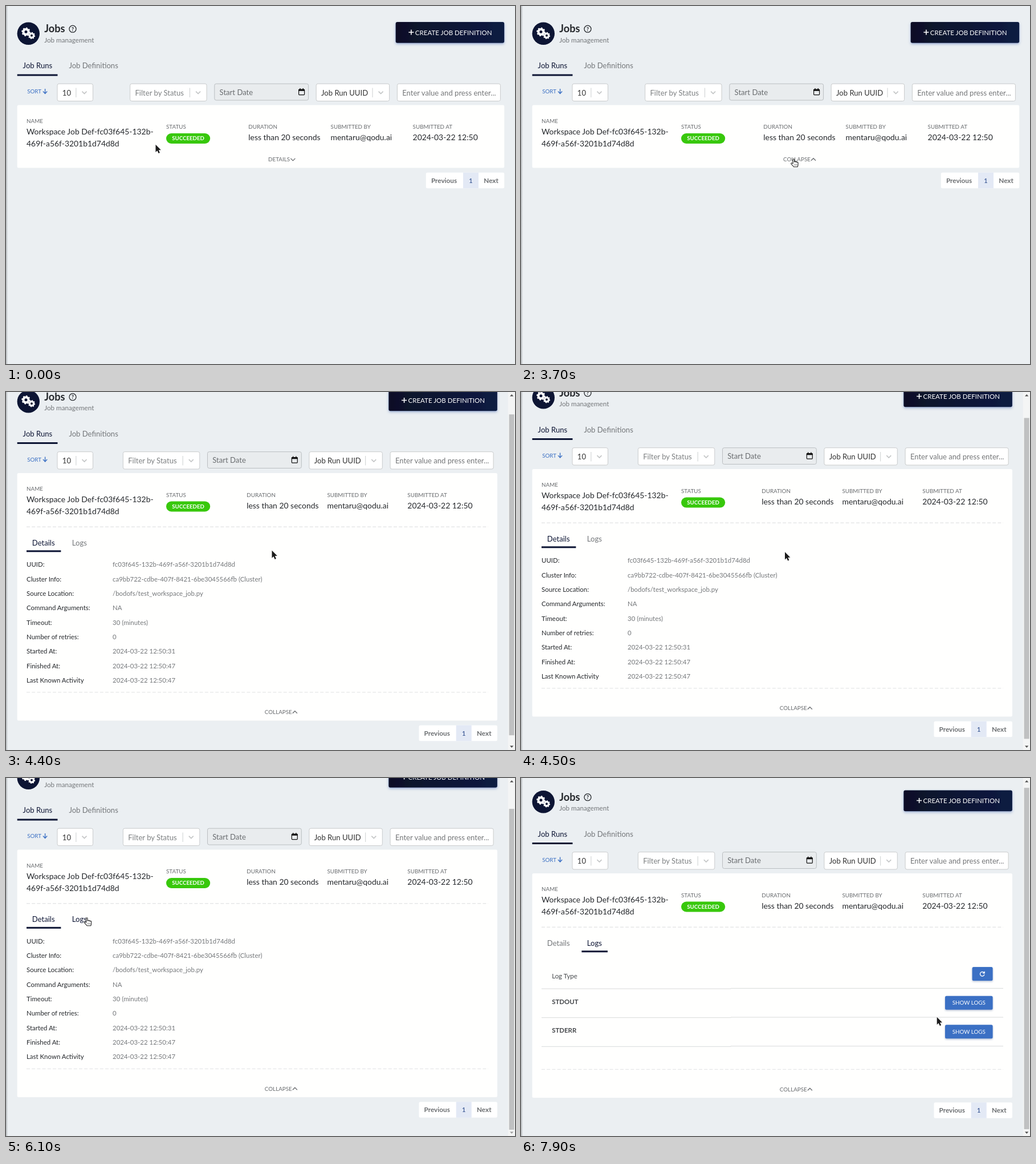
Write an HTML page that moves like this. It is 893 px wide and 627 px high and loops after 8 s.

```html
<!DOCTYPE html>
<html lang="en">
<head>
<meta charset="utf-8">
<title>Jobs</title>
<style>
  html, body { margin: 0; width: 100%; height: 100%; overflow: hidden; background: #ebeff2; }
  svg { display: block; width: 893px; height: 627px; font-family: Lato, sans-serif; }
  text { white-space: pre; }
</style>
</head>
<body>
<svg id="stage" viewBox="0 0 893 627" xmlns="http://www.w3.org/2000/svg"></svg>
<script>
const LOOP = 8000, STEP = 100;
const NAVY = '#0d1534', INK = '#24272b', GREY = '#74777a', BLUE = '#3b70c4';
const SIZE = { xs: 9.82, s: 11.45, m: 13.09, l: 13.91 };

// Markup helpers
const text = (x, y, str, size, fill = INK, more = '') =>
  `<text x="${x}" y="${y}" font-size="${size}" fill="${fill}" ${more}>${str}</text>`;
const rect = (x, y, w, h, fill, more = '') =>
  `<rect x="${x}" y="${y}" width="${w}" height="${h}" fill="${fill}" ${more}/>`;
const line = (d, stroke, width = 1, more = '') =>
  `<path d="${d}" fill="none" stroke="${stroke}" stroke-width="${width}" ${more}/>`;
const group = (id, inner, more = '') => `<g id="${id}" ${more}>${inner}</g>`;
const chevron = (x, y, dir, color, width = 1.5) =>
  line(`M${x - 4} ${y - 2 * dir}l4 ${4 * dir}l4 ${-4 * dir}`, color, width);
const dashes = y => line(`M36 ${y}H846`, '#e6e7e8', 1.4, 'stroke-dasharray="6 3.2" class="rule"');
const bold = 'font-weight="700"', middle = 'text-anchor="middle"';

function field(x, w, label, color, fill = '#fff', h = 30.3) {
  const border = fill === '#fff' ? '#c9cbcc' : '#babec1';
  return rect(x, 136.2, w, h, fill, `rx="3" stroke="${border}"`) +
    text(x + 8.8, fill === '#fff' ? 156.5 : 155.5, label, SIZE.m, color);
}

function select(x, w, label, color) {
  const sep = x + w - 29.6;
  return field(x, w, label, color) + line(`M${sep} 143.5V160`, '#cccfd0') +
    chevron(sep + 14.6, 151.6, 1, '#c3c5c6', 1.6);
}

const gear = (x, y, r) =>
  `<g transform="translate(${x} ${y})" fill="none" stroke="#fff">
    <circle r="${r * .62}" stroke-width="${r * .55}"/>
    <circle r="${r * .9}" stroke-width="${r * .32}" pathLength="16" stroke-dasharray="1 1"/></g>`;

const column = (id, x, title, value) =>
  group(id, text(x, 215.3, title, SIZE.xs, '#686b6e') + (value ? text(x, 235.4, value, SIZE.l) : ''));

const button = (x, y, w, label) =>
  rect(x, y, w, 24, BLUE, 'rx="2.5" filter="url(#soft)"') +
  (label ? text(x + w / 2, y + 15.5, label, SIZE.xs, '#fff', middle) : '');

const header =
  `<circle cx="39.3" cy="48.2" r="19.7" fill="${NAVY}"/>` +
  gear(35, 45.3, 7.3) + gear(45, 51.8, 5.8) +
  text(67.2, 46.2, 'Jobs', 18.2, INK, bold) +
  `<circle cx="117" cy="40.2" r="6" fill="none" stroke="${INK}" stroke-width="1.3"/>` +
  text(117, 43.6, '?', 9.5, INK, `${bold} ${middle}`) +
  text(67.2, 63.6, 'Job management', 11.7, GREY) +
  text(29.6, 109.2, 'Job Runs', SIZE.m, NAVY) +
  rect(19.7, 119.5, 70.8, 3, NAVY) +
  text(110.4, 109.2, 'Job Definitions', SIZE.m, GREY) +
  text(37.2, 153.2, 'SORT', SIZE.xs, BLUE) +
  line('M68.6 145v8.4m-3.6-3.8l3.6 3.8l3.6-3.8', BLUE, 1.4) +
  select(90, 62.5, '10', '#333');

const calendar =
  rect(513.6, 146, 10, 9.6, 'none', 'rx="1" stroke="#111" stroke-width="1.2"') +
  rect(513.4, 146, 10.4, 2.8, '#111') + line('M516 144v2m5.2-2v2', '#111', 1.3);

const tools =
  rect(683.6, 28, 190.6, 36.8, 'url(#night)', 'rx="3" filter="url(#glow)"') +
  line('M706.4 46h9m-4.5-4.5v9', '#fff', 1.6) +
  text(717.8, 50.5, 'CREATE JOB DEFINITION', 11.55, '#fff') +
  select(217.7, 134.4, 'Filter by Status', '#7d8082') +
  field(365.8, 164.8, 'Start Date', '#6a6d70', '#e9ecee', 28.8) + calendar +
  select(544.2, 128.4, 'Job Run UUID', '#333') +
  field(686.4, 181, 'Enter value and press enter...', '#757779');

const summary =
  text(36, 204.6, 'NAME', SIZE.xs, '#686b6e') +
  text(36, 224.6, 'Workspace Job Def-fc03f645-132b-', SIZE.l) +
  text(36, 245.7, '469f-a56f-3201b1d74d8d', SIZE.l) +
  column('status', 281, 'STATUS') +
  rect(281, 223, 77.2, 18, '#38c80c', 'rx="9"') +
  text(319.6, 235.4, 'SUCCEEDED', 9.7, '#fff', `${bold} ${middle}`) +
  column('duration', 425.3, 'DURATION', 'less than 20 seconds') +
  column('author', 569.6, 'SUBMITTED BY', 'mentaru@qodu.ai') +
  column('date', 713.6, 'SUBMITTED AT', '2024-03-22 12:50');

const info = [
  ['UUID:', 'fc03f645-132b-469f-a56f-3201b1d74d8d'],
  ['Cluster Info:', 'ca9bb722-cdbe-407f-8421-6be3045566fb (Cluster)'],
  ['Source Location:', '/bodofs/test_workspace_job.py'],
  ['Command Arguments:', 'NA'],
  ['Timeout:', '30 (minutes)'],
  ['Number of retries:', '0'],
  ['Started At:', '2024-03-22 12:50:31'],
  ['Finished At:', '2024-03-22 12:50:47'],
  ['Last Known Activity', '2024-03-22 12:50:47']
].map(([name, value], i) => {
  const y = 337.7 + 25.34 * i;
  return text(36, y, name, SIZE.s) + text(187, y, value, SIZE.s, GREY);
}).join('');

const logs =
  text(54.2, 357, 'Log Type', SIZE.s, '#45484b') +
  button(791.6, 337.6, 36) +
  line('M812.3 347.4a3.8 3.8 0 1 0 .7 3.2m.2-5.4v3.2h-3.2', '#fff', 1.4) +
  ['STDOUT', 'STDERR'].map((name, i) =>
    text(54.2, 402.1 + 50.6 * i, name, SIZE.s, '#45484b', bold) +
    button(744, 388.2 + 50.6 * i, 83.6, 'SHOW LOGS')).join('') +
  [375.6, 426.2, 476.8].map(y => line(`M36 ${y}H368V${y - .7}H846`, '#d8dadb')).join('');

const tabs =
  dashes(267.7) +
  text(45.8, 300.2, 'Details', SIZE.m, NAVY, 'id="tabDetails"') +
  text(115.8, 300.2, 'Logs', SIZE.m, GREY, 'id="tabLogs"') +
  rect(36, 308.8, 60.4, 3, NAVY, 'id="bar"');

const pager =
  rect(736.8, 8.2, 137.4, 27.6, '#fff', 'rx="2.5"') +
  rect(802, 8.2, 27, 27.6, '#e3e9f5') +
  text(745.9, 26.2, 'Previous', 11.75, '#6a6d70', bold) +
  text(815.5, 26.2, '1', 11.75, '#2c4c8c', middle) +
  text(838.3, 26.2, 'Next', 11.75, '#6a6d70', bold);

// Coordinates relative to the bottom edge of the card
const footer =
  group('lowRule', dashes(-49.6)) +
  group('toggle',
    group('open', text(460, -11.1, 'DETAILS', SIZE.xs, '#686b6e') + chevron(503.4, -14.6, 1, '#686b6e', 1.3)) +
    group('close', text(460, -11.1, 'COLLAPSE', SIZE.xs, '#686b6e') + chevron(513, -14.8, -1, '#686b6e', 1.3))) +
  group('pager', pager);

const scrollbar =
  rect(880.8, 0, 12.2, 627, '#f4f5f5') +
  rect(882.6, 11, 9, 562, '#bfc0c1', 'id="thumb"') +
  `<path id="up" d="M884 7.5h6.4l-3.2-3.6z"/><path id="down" d="M884 619.5h6.4l-3.2 3.6z"/>`;

const arrow = `<path d="M0 0V13.2L3 10.4L5.1 15.3L7.4 14.3L5.3 9.5H9.4Z" fill="#1b1b1b"
  stroke="#fff" stroke-width="1" paint-order="stroke"/>`;
const hand = `<path d="M4.4 9V2.2Q4.4 .8 5.6 .8T6.8 2.2V6.2Q7 5.2 8 5.3T9.2 6.5Q9.5 5.7 10.4 5.9T11.4 7
  Q11.8 6.4 12.6 6.6T13.4 7.8V10.6Q13.4 12.6 12.4 14.8H5.8Q4.6 12.8 1.4 9.8Q.6 8.7 1.4 8.1T3.2 8.2Z"
  fill="#fff" stroke="#222" stroke-width="1.1" stroke-linejoin="round"/>` +
  line('M7.2 9.6v3m2-3v3m2-3v3', '#555', .7);

document.getElementById('stage').innerHTML = `
  <defs>
    <linearGradient id="night"><stop stop-color="#0a1027"/><stop offset="1" stop-color="#101b42"/></linearGradient>
    <linearGradient id="edge"><stop stop-color="#aeb2b5"/><stop offset=".45" stop-color="#cfd3d6"/>
      <stop offset="1" stop-color="#ebeff2"/></linearGradient>
    <filter id="glow" x="-10%" y="-30%" width="120%" height="180%">
      <feDropShadow dx="0" dy="2" stdDeviation="2.2" flood-color="#4a6bb5" flood-opacity=".5"/></filter>
    <filter id="soft" x="-20%" y="-30%" width="140%" height="180%">
      <feDropShadow dx="0" dy="1.5" stdDeviation="1.5" flood-color="#34558f" flood-opacity=".4"/></filter>
  </defs>` +
  rect(0, 0, 893, 627, '#ebeff2') +
  group('page',
    header + group('tools', tools) +
    rect(19.7, 173.5, 854.5, 110, '#fffffe', 'id="card" rx="2.5"') + summary +
    group('panel', tabs + group('info', info) + group('logs', logs)) +
    group('footer', footer)) +
  rect(0, 0, 3.5, 627, 'url(#edge)') +
  group('scrollbar', scrollbar) +
  group('cursor', group('arrow', arrow) + group('hand', hand));

// Pointer path: time, x, y, 1 for the hand shape
const path = [
  [0, 262.5, 242.8, 0], [1200, 262.5, 242.8, 0], [1300, 389, 286, 0], [1400, 389, 286, 0],
  [1600, 430, 301, 0], [1800, 463, 289, 0], [2000, 475.5, 268, 1], [2100, 475.5, 268, 1],
  [2200, 475.5, 267, 1], [2500, 475.5, 267, 1], [2600, 474, 267, 1], [2800, 474, 267, 1],
  [2900, 472.7, 267, 1], [3700, 472.7, 267, 1], [3800, 477, 269.5, 0], [4100, 477, 269.5, 0],
  [4500, 463, 280.3, 0], [4800, 458.5, 281, 0], [5000, 458.5, 281, 0], [5300, 340, 272, 0],
  [5600, 190, 243, 0], [5700, 148, 240, 1], [5900, 137, 243, 1], [6000, 137, 243, 1],
  [6100, 136.3, 244, 1], [7100, 136.3, 246, 1], [7200, 135, 262, 1], [7300, 135, 283, 1],
  [7400, 135, 283, 1], [7500, 190, 318, 0], [7700, 560, 442, 0], [7800, 690, 436, 0],
  [7900, 729.7, 418.8, 0], [8000, 729.7, 418.8, 0]
];

const $ = id => document.getElementById(id);
const show = (id, on) => { $(id).style.display = on ? '' : 'none'; };
const move = (id, x, y) => $(id).setAttribute('transform', `translate(${x} ${y})`);
const set = (id, attrs) => { for (const k in attrs) $(id).setAttribute(k, attrs[k]); };
const ramp = (t, a, b) => Math.min(1, Math.max(0, (t - a) / (b - a)));
const mix = (a, b, u) => a + (b - a) * u;
const easeOut = (u, n) => 1 - (1 - u) ** n;
const shade = u => `rgb(${[[13, 116], [21, 119], [52, 122]].map(([a, b]) => Math.round(mix(a, b, u)))})`;

function pointer(t) {
  const i = path.findLastIndex(k => k[0] <= t);
  const a = path[i], b = path[i + 1] || a;
  const u = ramp(t, a[0], b[0] + (a === b));
  move('cursor', mix(a[1], b[1], u), mix(a[2], b[2], u));
  show('hand', a[3]);
  show('arrow', !a[3]);
}

function draw(t) {
  const open = t >= 3800, onLogs = t >= 6200;
  const shift = open ? -12.3 : 0;
  const bottom = !open ? 283.5 : onLogs ? 566.5 : 607;
  const limit = bottom + 68 - 627;
  const scroll = onLogs ? 6.5 : 48 * easeOut(ramp(t, 4100, 4800), 1.91);

  move('page', 0, -scroll);
  move('tools', shift, 0);
  ['duration', 'author', 'date'].forEach((id, i) => move(id, shift * (i + 1) / 4, 0));
  set('card', { width: 854.5 + shift, height: bottom - 173.5 });
  move('footer', 0, bottom);
  move('toggle', shift / 2, 0);
  move('pager', shift, 0);
  show('open', t < 3600);
  show('close', t >= 3600);
  show('panel', open);
  show('lowRule', open);
  show('info', !onLogs);
  show('logs', onLogs);

  const slide = easeOut(ramp(t, 6100, 6500), 2);
  set('bar', { x: mix(36, 106.4, slide), width: mix(60.4, 45.6, slide) });
  set('tabDetails', { fill: shade(ramp(t, 6100, 6600)) });
  set('tabLogs', { fill: shade(1 - ramp(t, 5700, 5900)) });

  show('scrollbar', open);
  const track = 605, total = 627 + limit;
  set('thumb', { y: 11 + scroll * track / total, height: track * 627 / total });
  set('up', { fill: scroll > 0 ? '#505050' : '#a0a0a0' });
  set('down', { fill: scroll < limit - .5 ? '#505050' : '#a0a0a0' });
  pointer(t);
}

let last = -1;
function tick() {
  const t = Math.floor(performance.now() % LOOP / STEP) * STEP;
  if (t !== last) draw(last = t);
  requestAnimationFrame(tick);
}
tick();
</script>
</body>
</html>
```
